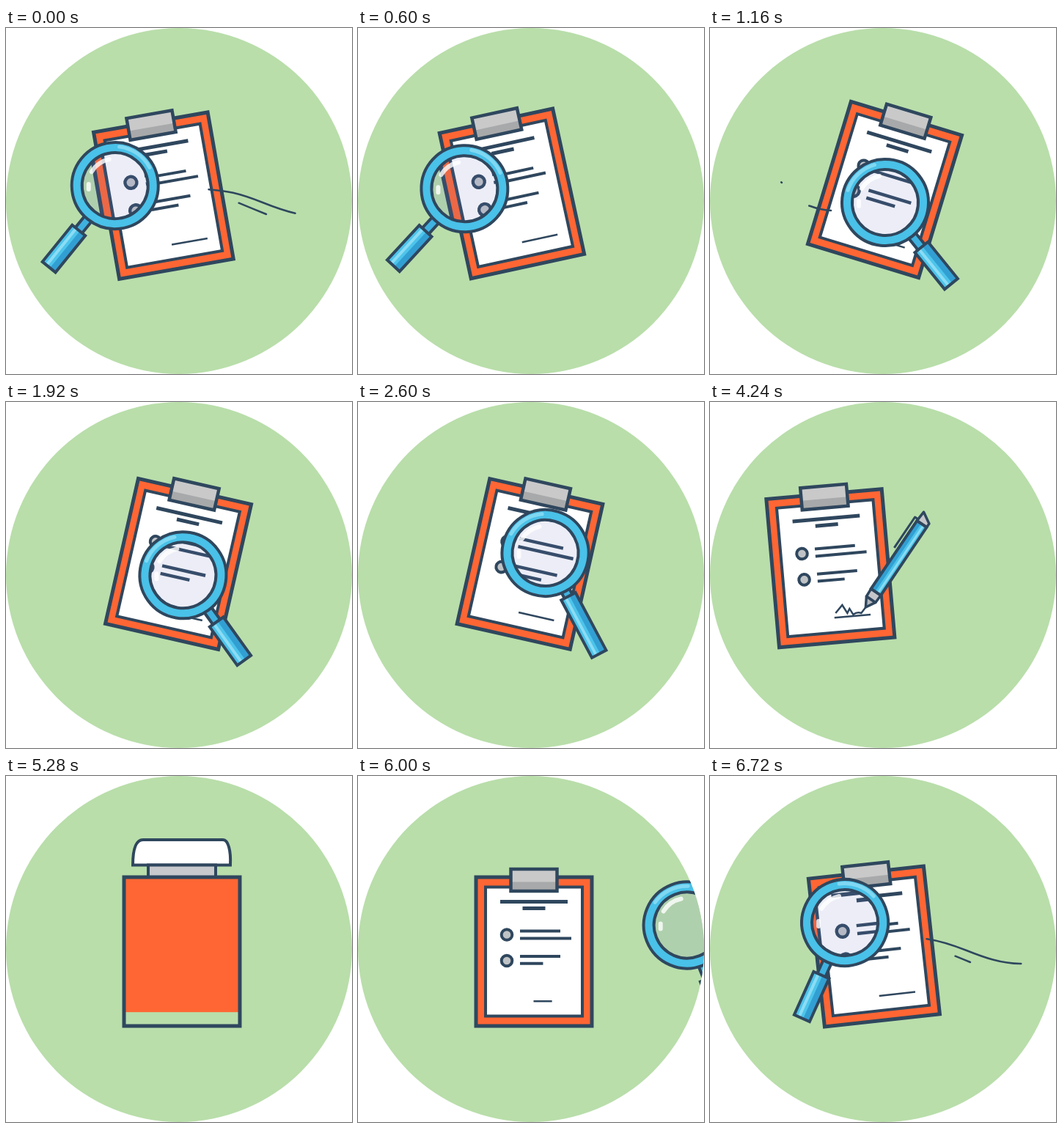
An HTML page that plays this animation: 472 by 472 pixels, repeating every 6760 ms.

```html
<!DOCTYPE html>
<html lang="en">
<head>
<meta charset="utf-8">
<title>Clipboard loop</title>
<style>
html, body { margin: 0; width: 100%; height: 100%; overflow: hidden; background: #fff; }
svg { display: block; width: 100vw; height: 100vh; }
.ink { stroke: #2f475e; }
.none { fill: none; }
</style>
</head>
<body>
<svg viewBox="0 0 472 472">
  <defs>
    <clipPath id="stageClip"><circle cx="236" cy="236" r="236"/></clipPath>
    <clipPath id="lensClip"><circle id="lensHole" r="45"/></clipPath>
  </defs>
  <circle cx="236" cy="236" r="236" fill="#b9deaa"/>
  <g clip-path="url(#stageClip)">
    <g id="boardPlace">
      <g id="board">
        <path id="cap" class="ink" fill="#fff" stroke-width="4" d="M-67-118C-67-140-63-152.5-53-152.5H56C63-152.5 67-138 66-118Z"/>
        <rect id="neck" class="ink" fill="#c8c9cc" stroke-width="4" x="-46" y="-118" width="92" height="17"/>
        <rect id="fill" x="-79" y="-101.5" width="158" fill="#ff6634"/>
        <rect class="ink none" x="-79" y="-101.5" width="158" height="203" stroke-width="5"/>
        <rect id="paper" class="ink" x="-66" y="-88" width="132" height="176" fill="#fff" stroke-width="4"/>
        <g id="rows" class="ink none"></g>
        <g id="bullets" class="ink" fill="#c0c3c5" stroke-width="4"></g>
        <path id="sign" class="ink none" stroke-width="2.5" pathLength="1" d="M1.6 61.7L11.6 51.5 17.6 63 21.1 57.3 25.4 65.7Q31 62 36.5 64.7L43.2 57.3"/>
        <g id="clip">
          <rect id="clipBody" fill="#c9c9ca"/>
          <rect id="clipShade" x="-31.5" y="-95" width="63" height="12.5" fill="#a8a9aa"/>
          <rect id="clipEdge" class="ink none" stroke-width="4.5"/>
        </g>
      </g>
    </g>
    <g id="trails" class="ink none" stroke-width="2.5"></g>
    <g id="lens" clip-path="url(#lensClip)">
      <rect width="472" height="472" fill="#b9deaa"/>
      <use id="zoomed" href="#board"/>
      <rect width="472" height="472" fill="#7078bd" opacity=".13"/>
    </g>
    <g id="tool">
      <g id="ring">
        <rect class="ink" x="-6" y="57" width="12" height="24" fill="#3fb2e0" stroke-width="4"/>
        <circle class="none" r="52" stroke="#49c1e8" stroke-width="15"/>
        <path class="none" d="M-29-45A53.500 53.500 0 0 1 21-49" stroke="#80d8f2" stroke-width="5" stroke-linecap="round"/>
        <circle class="ink none" r="59" stroke-width="4"/>
        <circle class="ink none" r="45" stroke-width="4"/>
        <g id="glint" class="none" stroke="#fff" stroke-width="6" stroke-linecap="round" opacity=".8">
          <path d="M-32-19A37 37 0 0 1-8-36"/><path d="M-36-2V5"/>
        </g>
      </g>
      <g id="penParts" class="ink" stroke-width="3.500" stroke-linejoin="round">
        <path class="none" d="M13 89V139.500H8" stroke-width="3"/>
        <path d="M8 137L7 152-8 143V137Z" fill="#c5c6ca"/>
        <path d="M0 0L7.500 13H-7.500Z" fill="#b5b8bd"/>
        <path d="M7.500 13L8 25H-8L-7.500 13Z" fill="#c5c6ca"/>
      </g>
      <rect id="grip" fill="#4dc4ea"/>
      <rect id="gripDark" fill="#329fd3"/>
      <rect id="gripLight" fill="#8bdcf4"/>
      <rect id="gripEdge" class="ink none" stroke-width="4"/>
    </g>
  </g>
</svg>
<script>
const LOOP = 6760, START = 4760;
const $ = id => document.getElementById(id);
const set = (el, attrs) => { for (const k in attrs) el.setAttribute(k, attrs[k]); };
const add = (parent, tag, attrs) => {
  const el = document.createElementNS('http://www.w3.org/2000/svg', tag);
  set(el, attrs);
  return parent.appendChild(el);
};
const ramp = (t, a, b) => Math.min(1, Math.max(0, (t - a) / (b - a)));
const smooth = (t, a, b) => { const p = ramp(t, a, b); return p * p * (3 - 2 * p); };
const mix = (a, b, p) => a + (b - a) * p;
const show = (el, on) => set(el, { visibility: on ? 'visible' : 'hidden' });

// Smooth keyframes without overshoot: rows of [time, ...values]
function track(keys) {
  const last = keys.length - 1;
  const slope = (i, c) => (keys[i + 1][c] - keys[i][c]) / (keys[i + 1][0] - keys[i][0]);
  const tangent = (i, c) => {
    if (i === 0 || i === last) return 0;
    const a = slope(i - 1, c), b = slope(i, c);
    return a * b <= 0 ? 0 : 2 * a * b / (a + b);
  };
  return t => {
    if (t <= keys[0][0]) return keys[0].slice(1);
    if (t >= keys[last][0]) return keys[last].slice(1);
    let i = 0;
    while (t >= keys[i + 1][0]) i++;
    const k = keys[i], n = keys[i + 1], d = n[0] - k[0], p = (t - k[0]) / d;
    return k.slice(1).map((v, j) => {
      const c = j + 1, q = 1 - p;
      return v * (1 + 2 * p) * q * q + n[c] * p * p * (3 - 2 * p)
        + d * p * q * (q * tangent(i, c) - p * tangent(i + 1, c));
    });
  };
}

// Times before zero belong to the bottle and the arrival of the lens
const boardAt = track([
  [-300, 240, 239.5, 0], [-40, 224, 232.5, -6.2], [0, 215, 228.7, -9.9],
  [140, 203, 224, -16], [680, 212, 226, -11], [1080, 241, 220, 17.8],
  [1160, 238.5, 220.5, 16.9], [1400, 235.5, 221, 13], [2600, 234.5, 221, 12.7],
  [2940, 231, 222, 17], [3400, 247, 227.5, -9], [3680, 249.7, 227.5, -6.5],
  [3960, 252, 227.5, -6], [4080, 238, 227, -5.5], [4240, 165, 226.7, -5], [4520, -150, 226, -3]
]);
const toolAt = track([
  [-920, 560, 205, -25], [-640, 375, 202, -18], [-360, 368, 200, -12], [-160, 290, 198, 4],
  [-40, 185, 200, 24], [0, 149, 215, 39], [120, 130, 224, 45], [680, 150, 218, 42],
  [920, 200, 210, -4], [1160, 239, 238, -39], [1400, 239, 238, -37], [2100, 243, 235, -35],
  [2600, 255.5, 206, -28], [2720, 280, 205, -32], [2900, 345, 285, -50], [3080, 370, 210, -85],
  [3240, 345, 120, -112], [3400, 308, 160, -114], [3560, 270, 250, -119], [3680, 258, 288, -125],
  [4240, 211, 281, -146], [4520, 0, 281, -150]
]);
const gripAt = track([[2100, 78.5, 143, 11.5], [2600, 67, 156, 11], [2950, 25, 137, 8]]);

const rows = [
  [-46, 46, -68, 5], [-15.5, 15.5, -59, 5], [-19, 36, -28, 4], [-19, 51, -18, 4],
  [-19, 36, 6.5, 4], [-19, 18, 16.3, 4], [-0.5, 49, 67.8, 2.5]
].map(([a, b, y, w]) => add($('rows'), 'path', { d: `M${a} ${y}H${b}`, 'stroke-width': w, pathLength: 1 }));
const bullets = [-23, 12.5].map(y => add($('bullets'), 'circle', { cx: -37, cy: y }));

// Each wind line: path, head start/end, tail start/end
const trails = [
  ['M468 246C425 266 385 252 350 238S300 222 274 220', -410, 6, -99, 168],
  ['M355 254Q325 242 290 227', -88, 66, 10, 170],
  ['M60 165C70 215 105 236 137 243Q150 248 165 249', 780, 1000, 940, 1220],
  ['M72 172Q80 195 98 211', 860, 1040, 960, 1166],
  ['M380 55Q348 88 334 134', 3400, 3640, 3520, 3762],
  ['M396 50Q378 66 363 84', 3440, 3640, 3540, 3720]
].map(([d, ...times]) => ({ times, el: add($('trails'), 'path', { d, pathLength: 1, 'stroke-linecap': 'round' }) }));

const draw = (el, p) => { show(el, p > 0); set(el, { 'stroke-dasharray': `${p} 2` }); };

function drawBoard(t, place) {
  const pop = t < -1780 ? 1.03 * smooth(t, -1960, -1780) : mix(1.03, 1, smooth(t, -1780, -1680));
  const bounce = 20 * Math.sin(Math.PI * ramp(t, -1400, -1180));
  const [x, y, angle] = place;
  const base = `translate(${x} ${y + bounce}) rotate(${angle}) scale(${pop})`;
  set($('boardPlace'), { transform: base });
  set($('zoomed'), { transform: base + ' scale(1.1)' });
  show($('boardPlace'), pop > 0 && t < 4560);

  const capHeight = 1 - smooth(t, -1460, -1330);
  const capDrop = -26 * (1 - smooth(t, -1760, -1600));
  show($('cap'), t > -1760 && capHeight > 0);
  set($('cap'), { transform: `translate(0 ${capDrop - 118 * (1 - capHeight)}) scale(1 ${capHeight})` });

  const m = smooth(t, -1330, -1100);
  show($('neck'), m === 0 && t > -1800);
  show($('clip'), m > 0);
  const half = mix(46, 31.5, m);
  const clip = { x: -half, width: 2 * half, y: mix(-118, -112.5, m), height: mix(17, 30, m) };
  set($('clipBody'), clip);
  set($('clipEdge'), clip);
  set($('clipShade'), { opacity: ramp(m, 0.6, 1) });

  set($('fill'), { height: 203 * ramp(t, -1860, -1440) });
  const sheet = smooth(t, -1300, -1080);
  show($('paper'), sheet > 0);
  set($('paper'), { transform: `scale(${sheet})` });
  rows.forEach((row, i) => draw(row, smooth(t, -1120 + i * 45, -940 + i * 45)));
  bullets.forEach((dot, i) => {
    const s = smooth(t, -1060 + i * 90, -900 + i * 90);
    show(dot, s > 0);
    set(dot, { r: 7.3 * s });
  });
}

function drawTool(t, place) {
  let [x, y, angle] = toolAt(t);
  const written = ramp(t, 3670, 4160);
  draw($('sign'), written);
  if (t >= 3680) {
    const path = $('sign'), tip = path.getPointAtLength(path.getTotalLength() * written);
    const r = place[2] * Math.PI / 180, c = Math.cos(r), s = Math.sin(r);
    x = place[0] + tip.x * c - tip.y * s;
    y = place[1] + tip.x * s + tip.y * c;
  }
  const visible = t > -920 && t < 4560;
  const size = 1 - smooth(t, 2650, 2900), pen = smooth(t, 2750, 2950);
  show($('tool'), visible);
  show($('lens'), visible && size > 0);
  set($('tool'), { transform: `translate(${x} ${y}) rotate(${angle})` });
  set($('ring'), { transform: `scale(${size})` });
  set($('glint'), { transform: `rotate(${-angle})` });
  set($('lensHole'), { cx: x, cy: y, r: 45 * size });
  set($('penParts'), { opacity: pen });

  const [near, far, w] = gripAt(t);
  const bar = (id, a, b) => set($(id), { x: a * w, y: near, width: (b - a) * w, height: far - near });
  bar('grip', -1, 1);
  bar('gripDark', 0.15, 1);
  bar('gripLight', -0.55, -0.2);
  bar('gripEdge', -1, 1);
}

function render(time) {
  const t = time >= START ? time - LOOP : time;
  const place = boardAt(t);
  drawBoard(t, place);
  drawTool(t, place);
  for (const { el, times: [h0, h1, t0, t1] } of trails) {
    const head = ramp(t, h0, h1), tail = ramp(t, t0, t1);
    show(el, head > tail);
    set(el, { 'stroke-dasharray': `${Math.max(0, head - tail)} 3`, 'stroke-dashoffset': -tail });
  }
}

const began = performance.now();
function tick() {
  render((performance.now() - began) % LOOP);
  requestAnimationFrame(tick);
}
tick();
</script>
</body>
</html>
```
